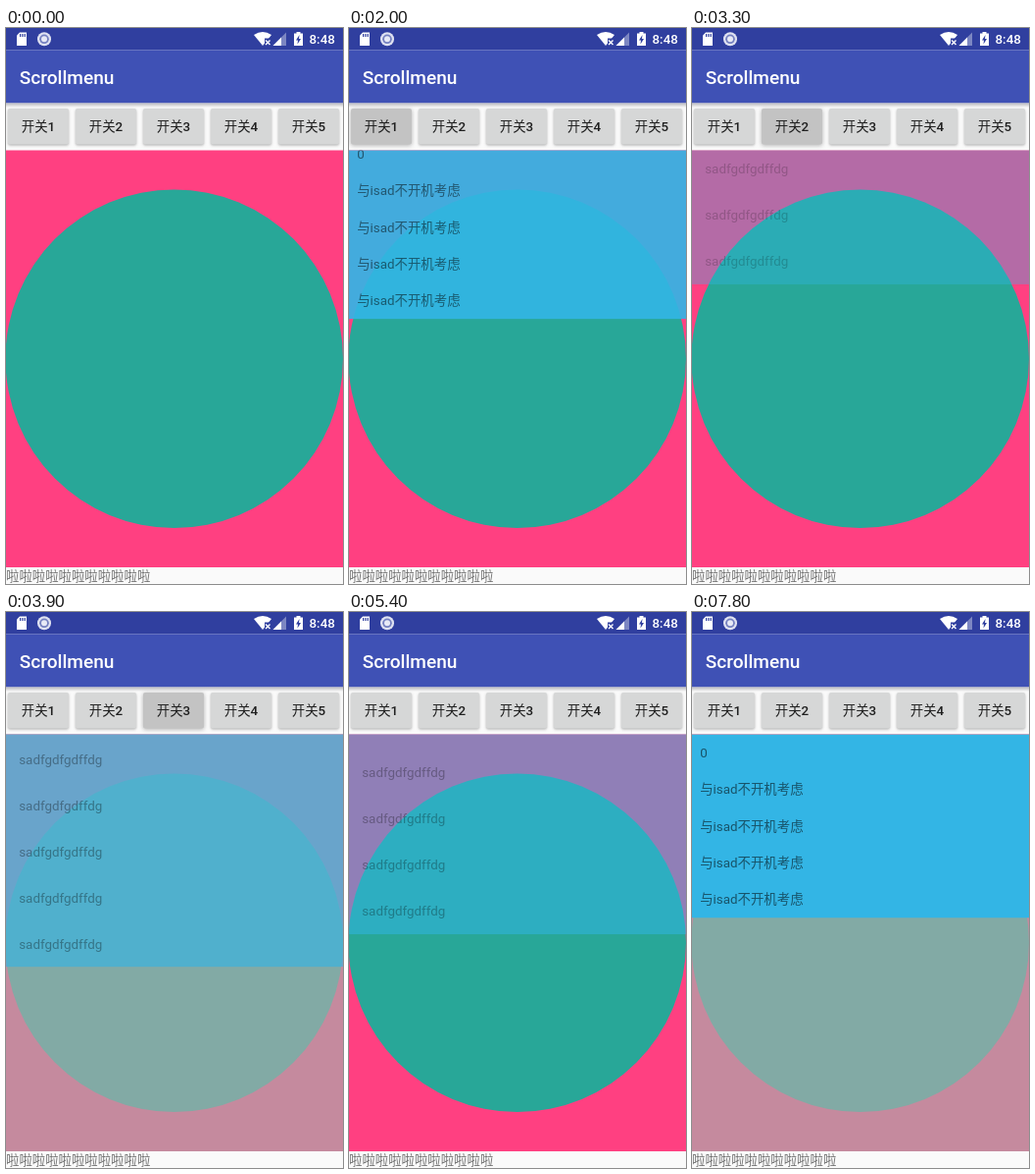
Recreate the animation shown at these times as an HTML page with a canvas. Size 344 px wide and 566 px high, loop 8 s.

```html
<!DOCTYPE html>
<html lang="zh-CN">
<head>
<meta charset="utf-8">
<title>Scrollmenu</title>
<style>
  html, body { margin: 0; width: 100%; height: 100%; overflow: hidden; background: #fafafa; }
  canvas { display: block; width: 344px; height: 566px; }
</style>
</head>
<body>
<canvas id="stage" width="344" height="566"></canvas>
<script>
const ctx = document.getElementById('stage').getContext('2d');
const W = 344, LOOP = 8000, STEP = 100, TOP = 124.5, BOTTOM = 549;
const FONT = 'Roboto, "Noto Sans CJK SC", "Noto Sans CJK", sans-serif';
const BUTTON = '#d6d7d7', PRESSED = '#c3c3c3';

// button index, opening start and end, closing start and end
const menus = [
  [0, 965, 1200, 1955, 2200],
  [1, 2633, 2883, 3157, 3400],
  [2, 3760, 4000, 4210, 4400],
  [3, 4860, 5100, 5310, 5500],
  [4, 5710, 5900, 6457, 6700],
  [0, 7365, 7600, 9000, 9250]
];

// button index, from, to, colour
const presses = [
  [0, 1000, 1200, PRESSED], [0, 2000, 2200, PRESSED],
  [1, 2700, 2800, '#cecece'], [1, 2800, 2900, PRESSED], [1, 3100, 3400, PRESSED],
  [2, 3700, 4000, PRESSED], [2, 4000, 4600, '#d0d0d0'],
  [3, 4900, 5100, PRESSED],
  [4, 5800, 5900, PRESSED], [4, 6400, 6500, '#d3d4d4'], [4, 6500, 6700, PRESSED],
  [0, 7400, 7600, PRESSED]
];

function ease(t, start, end) {
  const x = Math.min(1, Math.max(0, (t - start) / (end - start)));
  return (1 - Math.cos(Math.PI * x)) / 2;
}

function rect(x, y, w, h, color) {
  ctx.fillStyle = color;
  ctx.fillRect(x, y, w, h);
}

function disc(x, y, r, color) {
  ctx.fillStyle = color;
  ctx.beginPath();
  ctx.arc(x, y, r, 0, 2 * Math.PI);
  ctx.fill();
}

function shape(color, ...points) {
  ctx.fillStyle = color;
  ctx.beginPath();
  points.forEach(([x, y]) => ctx.lineTo(x, y));
  ctx.fill();
}

function text(str, x, y, color, size = 13.4, weight = 400, align = 'left') {
  ctx.font = `${weight} ${size}px ${FONT}`;
  ctx.textAlign = align;
  ctx.fillStyle = color;
  ctx.fillText(str, x, y);
}

function drawStatusBar() {
  rect(0, 0, W, 22.5, '#303f9f');
  // memory card
  shape('#fff', [14, 4.5], [21, 4.5], [21, 18], [11, 18], [11, 7.5]);
  for (const x of [14, 16.3, 18.6]) rect(x, 6, 1.2, 3, '#303f9f');
  // round indicator
  disc(39, 11.3, 7, '#dfe2f1');
  disc(39, 11.3, 4.8, '#7480c0');
  disc(39, 11.3, 3, '#e8eaf6');
  // wifi
  ctx.fillStyle = '#fff';
  ctx.beginPath();
  ctx.moveTo(262, 18);
  ctx.lineTo(253, 7);
  ctx.quadraticCurveTo(262, 1, 271, 7);
  ctx.fill();
  rect(264, 10.5, 7, 8, '#303f9f');
  ctx.strokeStyle = '#fff';
  ctx.lineWidth = 1.4;
  ctx.beginPath();
  ctx.moveTo(265, 12.5); ctx.lineTo(269.5, 17);
  ctx.moveTo(269.5, 12.5); ctx.lineTo(265, 17);
  ctx.stroke();
  // signal
  shape('#7d87c2', [286, 4.5], [286, 18], [272.5, 18]);
  shape('#fff', [281, 9.5], [281, 18], [272.5, 18]);
  // battery
  rect(294, 5.5, 9, 12.5, '#fff');
  rect(296.5, 4, 4, 2, '#fff');
  shape('#303f9f', [299.5, 7], [296, 12.5], [298, 12.5], [297.5, 16.5], [301, 11], [299, 11]);
  text('8:48', 309.5, 16, '#fff', 13.4, 500);
}

function drawBars() {
  rect(0, 22.5, W, 54, '#3f51b5');
  text('Scrollmenu', 13.8, 57, '#fff', 19.1, 500);
  const shadow = ctx.createLinearGradient(0, 76, 0, 81);
  shadow.addColorStop(0, '#b4b4b8');
  shadow.addColorStop(1, '#fafafa');
  rect(0, 76.5, W, 5, shadow);
}

function drawButton(i, t) {
  const x = 2 + 69 * i, y = 82;
  const press = presses.find(([b, from, to]) => b === i && t >= from && t < to);
  ctx.save();
  ctx.shadowColor = 'rgba(0,0,0,.3)';
  ctx.shadowBlur = press ? 4 : 2.5;
  ctx.shadowOffsetY = 1;
  ctx.fillStyle = press ? press[3] : BUTTON;
  ctx.beginPath();
  ctx.roundRect(x, y, 62, 36.5, 2);
  ctx.fill();
  ctx.restore();
  if (press && press[3] === '#cecece') disc(x + 36, 100, 17, '#c6c6c6');
  text('开关' + (i + 1), x + 31, 105.3, '#1f1f1f', 13.4, 500, 'center');
}

function drawContent() {
  rect(0, TOP, W, BOTTOM - TOP, '#ff4081');
  disc(171.7, 336.7, 172.3, '#28a798');
}

function drawMenu(index, shown) {
  const first = index === 0;
  const count = first ? 5 : 8;
  const row = first ? 37.35 : 47;
  const label = first ? '与isad不开机考虑' : 'sadfgdfgdffdg';
  const height = count * row;
  const y = TOP - height * (1 - shown);
  ctx.save();
  ctx.beginPath();
  ctx.rect(0, TOP, W, BOTTOM - TOP);
  ctx.clip();
  ctx.globalAlpha = shown;
  rect(0, y, W, height, '#33b5e5');
  for (let i = 0; i < count; i++) {
    text(i ? label : String(index), first ? 8.2 : 13.2, y + row * (i + 0.5) + 4.9, 'rgba(0,0,0,.54)');
  }
  ctx.restore();
}

function draw(now) {
  const t = Math.floor(now % LOOP / STEP) * STEP;
  rect(0, 0, W, 566, '#fafafa');
  drawStatusBar();
  drawBars();
  for (let i = 0; i < 5; i++) drawButton(i, t);
  drawContent();
  for (const [index, openStart, openEnd, closeStart, closeEnd] of menus) {
    if (t < openStart || t >= closeEnd) continue;
    if (t < closeStart) rect(0, TOP, W, BOTTOM - TOP, 'rgba(171,171,171,.69)');
    drawMenu(index, ease(t, openStart, openEnd) - ease(t, closeStart, closeEnd));
  }
  text('啦'.repeat(11), 0, 563.3, '#757575');
}

let origin;
function tick(now) {
  origin ??= now;
  draw(now - origin);
  requestAnimationFrame(tick);
}
draw(0);
requestAnimationFrame(tick);
</script>
</body>
</html>
```
